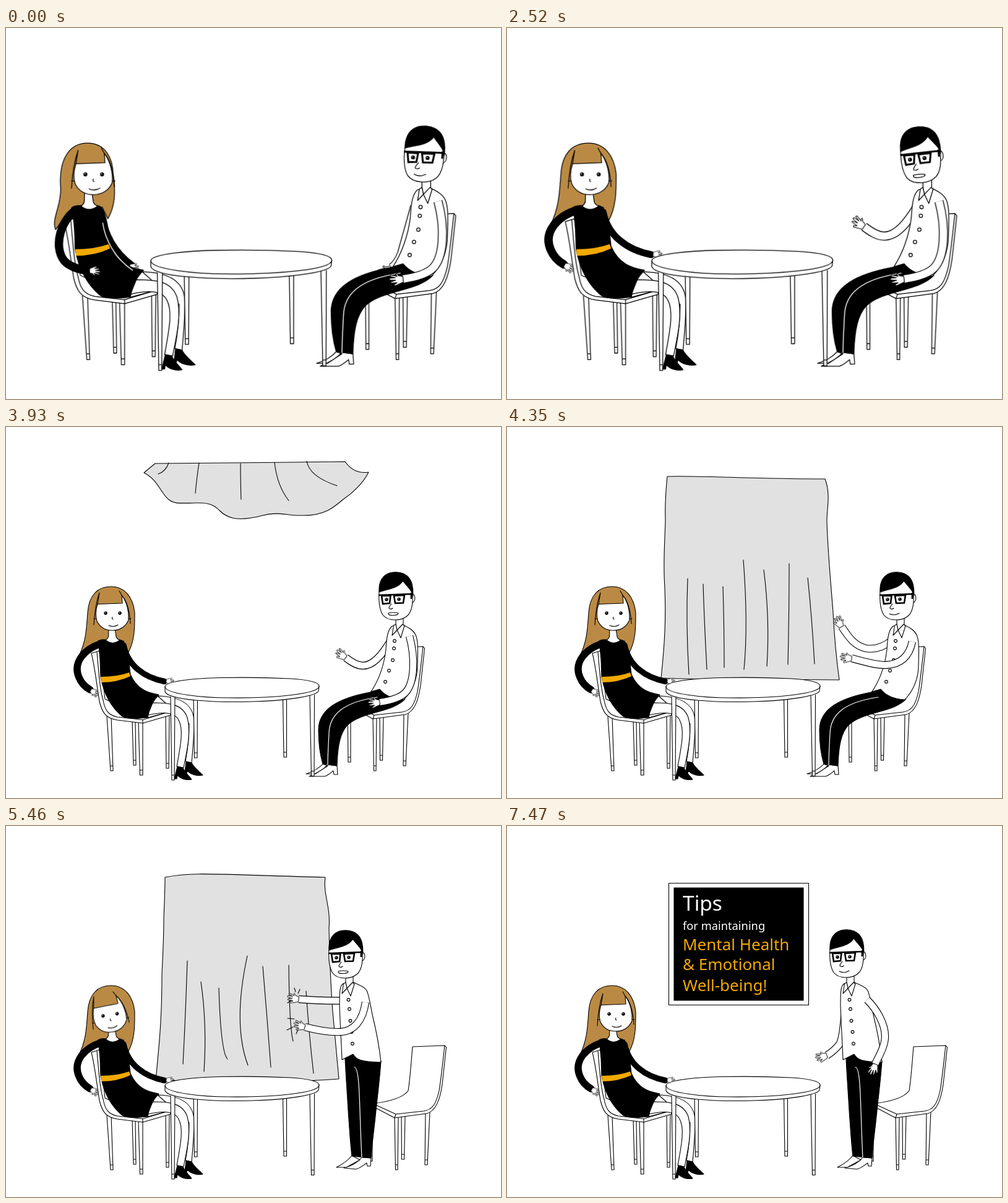
An HTML page for the animation above (7.53 s loop, 800x600 px).

```html
<!DOCTYPE html>
<html lang="en">
<head>
<meta charset="utf-8">
<title>Meeting at the table</title>
<style>
html, body { margin: 0; width: 100%; height: 100%; overflow: hidden; background: #fff; }
svg { display: block; width: 100%; height: 100%; }
path, circle, rect { fill: #fff; stroke: #000; stroke-width: 1.1; stroke-linejoin: round; }
.line { fill: none; stroke-linecap: round; }
.ink { fill: #000; }
.hair { fill: #ba8a45; }
.cloth { fill: #e1e1e1; }
.seam { fill: none; stroke: #fff; stroke-width: 1.2; stroke-linecap: round; }
.rim { fill: none; stroke-width: 12.4; }
.sleeve { fill: none; stroke: #fff; stroke-width: 10.2; }
.black { fill: none; stroke-width: 11.5; stroke-linecap: round; }
.thin { stroke-width: 9.5; }
.dot { fill: none; stroke-width: 5.8; stroke-linecap: round; }
.hole { fill: none; stroke: #fff; stroke-width: 3.6; stroke-linecap: round; }
.frame { fill: #fff; stroke-width: 2.6; stroke-linejoin: miter; }
.glint { fill: #fff; stroke: none; }
text { font-family: "Noto Sans", "Open Sans", sans-serif; font-weight: 500; font-size: 26px; fill: #f2a900; }
.wface { transform-origin: 172px 335px; }
.mhead { transform-origin: 636px 318px; }
.drop { transform-origin: 0 57px; }
</style>
</head>
<body>
<svg viewBox="0 0 800 600">
<defs>
  <path id="hand" d="M0-4L-7-6Q-10-12-11-8L-9-5L-19-8Q-22-6-18-5L-12-3L-21-3Q-24-1-20 0L-12 1L-20 3Q-22 5-18 5L-10 5L-15 8Q-15 11-11 9L0 5Z"/>
</defs>
<g class="camera">
  <g class="board">
    <rect x="261.5" y="92.5" width="226" height="197"/>
    <rect class="ink" x="270" y="100" width="209" height="182" stroke="none"/>
    <text x="284" y="137" style="font-size:33.5px;fill:#fff">Tips</text>
    <text x="284" y="168" style="font-size:18.3px;fill:#fff;font-weight:400">for maintaining</text>
    <text x="284" y="201">Mental Health</text>
    <text x="284" y="233">&amp; Emotional</text>
    <text x="284" y="267">Well-being!</text>
  </g>
  <g class="veil"><g class="drop">
    <path class="cloth sheet"/>
    <path class="line folds"/>
  </g></g>

  <!-- woman -->
  <g id="chairLegsW"></g>
  <path d="M138 366L151 362L160 440L229 470L266 460V466L221 479L180 474C160 471 155 460 151 444C147 420 144 390 138 366Z"/>
  <path class="line" d="M147 364C150 400 152 425 157 442C160 458 165 466 180 469L221 473.5L266 460M221 473.5V479"/>
  <path class="hair mane"/>
  <path class="black thin restArm"/>
  <g class="restHand"><use href="#hand" transform="scale(.6)"/></g>
  <path d="M245 435C285 436 304 450 304 478C304 500 302 520 300 543L290 541C294 520 296 500 296 480Z"/>
  <path d="M237 446C262 446 285 447 293 470C300 495 291 530 287 551L276 549C281 520 288 490 279 474C272 459 250 461 229 466Z"/>
  <path class="ink" d="M277 549L286 551C288 558 296 564 300 570C290 572 281 568 277 563L276 569H272Z"/>
  <path class="ink" d="M291 541L300 543C303 550 312 557 318 563C309 565 298 562 293 556L292 560L289 559Z"/>
  <path class="ink" d="M162 344Q172 354 183 344C188 344 191 348 193 354C199 370 199 385 201 400C212 425 230 430 247 433C238 442 231 455 229 470C210 472 195 472 188 468C168 452 158 430 153 405C152 385 153 365 148 347C152 343 158 344 162 344Z"/>
  <path d="M153 404Q180 404 199 397L201 403Q180 413 154 413Z" style="fill:#f2a900;stroke:none"/>
  <path class="seam crease" d="M191 368C194 390 207 416 232 433"/>
  <path class="black hipArm"/>
  <g class="hipHand"><use href="#hand" transform="scale(.65)"/></g>
  <path d="M166 326L165.500 339Q164 343 161 344.500Q172 354 184 344.500Q179 343 178 339L176 326" />
  <g class="wface">
    <path d="M148 286.500C145 296 144 305 147 314C152 324 161 329 172 329C185 329 194 322 198 312C199 300 196 284 187 272L188 285Z"/>
    <path class="line" d="M151 268L148 286.500M187 272L183 265M187 272C196 282 200 298 201 318M151 268C145 285 143 300 142 320M142 310H146M198 310H202"/>
    <circle class="ink" cx="161" cy="301" r="2.200"/><circle class="ink" cx="184" cy="301" r="2.200"/>
    <circle class="glint" cx="160.300" cy="300.300" r=".7"/><circle class="glint" cx="183.300" cy="300.300" r=".7"/>
    <path class="line" d="M172 307.500Q170.500 310 173 311M166 321Q174 324.500 181 320"/>
  </g>

  <!-- man -->
  <g class="chairM">
    <g id="chairLegsM"></g>
    <path d="M622 357L674 355L676.500 358L670 418C666 445 659 461 645 465L593 472L555 452L558 449C590 445 608 438 615 428C618 410 620 380 622 357Z"/>
    <path class="line" d="M674 355C670 390 668 410 665 428C660 450 654 459 640 461L595 466L558 449M595 466L593 472"/>
  </g>
  <path class="rim farArm"/><path class="sleeve farArm"/>
  <g class="farHand"><use href="#hand" transform="scale(.85)"/></g>
  <path class="shoes"/>
  <path class="ink trousers"/>
  <path class="seam inseam"/>
  <path class="shirt"/>
  <path class="dot buttons"/><path class="hole buttons"/>
  <g class="upper">
    <path d="M630 305V319L632 329L642 320V305"/>
    <path d="M626.500 321L624 337L632 328.500L638 341L644 321.500L641 319L632 328.500L630 319Z"/>
    <g class="mhead">
      <path d="M656 270C662 269 663 283 656 284Z"/>
      <path d="M603 266C602 282 604 296 609 304C618 315 639 314 649 305C656 298 658 284 657 268L641 248Z"/>
      <path class="ink" d="M603 267C602 250 609 240 620 236Q632 233 642 237C654 242 659 255 657.500 274C656 262 648 258 641.500 249C633 262 616 262 603 267Z"/>
      <path class="frame" d="M607 273L621.500 273L620 285L609 286ZM627 273L644 272L642 284.500L629 285Z"/>
      <path class="frame" d="M602 272L656 270M655 268V278"/>
      <circle class="ink" cx="615" cy="279" r="2.200"/><circle class="ink" cx="635" cy="278.500" r="2.200"/>
      <circle class="glint" cx="614.300" cy="278.300" r=".7"/><circle class="glint" cx="634.300" cy="277.800" r=".7"/>
      <path class="line" d="M623 286Q617 293 620 294Q623 295 625 293"/>
      <path class="mouth"/>
    </g>
  </g>
  <path class="rim nearArm"/><path class="sleeve nearArm"/>
  <g class="nearHand"><use href="#hand" transform="scale(.85)"/></g>
  <path class="line tugs" d="M455 286L461 282M466 262L468 268M475 264L472 271M455 311L466 312M454 330L464 325M469 336L472 329"/>

  <!-- table -->
  <g id="tableLegs"></g>
  <path d="M257 420C257 410 315 406 345 405.500C390 404.500 440 406 460 407C490 409 506 413 506 419L505 427C500 437 440 443 400 444C340 446 262 442 257 428Z"/>
  <path class="line" d="M257 420C258 432 320 438 360 438C430 439 506 432 506 419"/>
</g>
</svg>
<script>
const LOOP = 7530;

// Each leg: top x, top y, foot x, foot y, top width, foot width
const leg = ([x, y, fx, fy, w, fw]) =>
  `<path d="M${x} ${y}L${fx} ${fy}h${fw}L${x + w} ${y}M${fx} ${fy - 8}h${fw}"/>`;
const legs = (id, list) => { document.getElementById(id).innerHTML = list.map(leg).join(''); };

legs('chairLegsW', [[163, 468, 169, 556, 7, 4], [204, 474, 206, 547, 5, 4],
  [214, 476, 216.5, 563, 7, 4.5], [258, 464, 259, 552, 6, 4]]);
legs('chairLegsM', [[552, 450, 553, 542, 5, 4], [604, 468, 604.5, 539, 6, 4],
  [593, 470, 594.5, 556, 6, 3.5], [643, 462, 642, 548, 7, 4]]);
legs('tableLegs', [[303, 438, 304.5, 535, 6.5, 4.5], [447.5, 438, 449, 534, 6, 4.5],
  [266, 436, 268, 571, 7, 4], [491, 433, 493.5, 564.5, 7.5, 4.5]]);

// Keyframes are [ms, value, easing]; the ends are held to fill the loop.
const rules = [];
function anim(name, prop, keys) {
  const all = [[0, keys[0][1], keys[0][2]], ...keys, [LOOP, keys[keys.length - 1][1]]];
  const body = all.map(([ms, value, ease = 'ease-in-out']) =>
    `${(ms / LOOP * 100).toFixed(3)}%{${prop}:${value};animation-timing-function:${ease}}`).join('');
  rules.push(`@keyframes ${name}{${body}}.${name}{animation:${name} ${LOOP}ms infinite}`);
}
const move = (name, keys) => anim(name, 'transform', keys.map(([ms, x, y, turn = 0, ease]) =>
  [ms, `translate(${x}px,${y}px) rotate(${turn}deg)`, ease]));
const morph = (name, keys) => anim(name, 'd', keys.map(([ms, d, ease]) => [ms, `path("${d}")`, ease]));
const show = (name, from, to) => anim(name, 'opacity',
  [[0, 0, 'step-end'], [from, 1, 'step-end'], [to, to < LOOP ? 0 : 1, 'step-end']]);

const SINE = 'cubic-bezier(.37,0,.63,1)';
anim('camera', 'transform', [[2840, 'translate(-68px,-117px) scale(1.175)', SINE],
  [3390, 'translate(0px,0px) scale(1)']]);

// Woman
const mane = [
  'M126 377C120 362 134 345 133 320C130 280 145 258 170 258C195 258 205 280 205 300C209 325 208 345 198 362L190 346L150 346Z',
  'M118 370C130 345 130 325 132 300C134 272 148 258 170 258C192 258 205 275 208 300C208 320 209 345 197 366L190 346L150 346Z'];
morph('mane', [[1800, mane[0]], [2450, mane[1]]]);
morph('hipArm', [
  [1800, 'M155 350C134 362 122 400 138 420C146 429 160 432 172 434'],
  [2450, 'M155 350C128 358 107 380 118 405C122 415 129 421 136 425']]);
move('hipHand', [[1800, 173, 434, 180], [2450, 137, 426, 212]]);
morph('restArm', [
  [1800, 'M188 353C194 385 206 408 232 427'],
  [2450, 'M190 353C197 386 223 405 256 411.5']]);
move('restHand', [[1800, 228, 428, 190], [2450, 259, 411, 186]]);
anim('crease', 'opacity', [[1800, 1], [1950, 0]]);
move('wface', [[700, 6, 0], [1000, 6, 1], [1700, 6, 0], [2300, 0, 0], [4400, 0, 0], [5000, 1, 4, -9],
  [5600, 1, 4, -9], [6100, 4, 3], [6700, 4, 2], [7200, 4, 3]]);

// Man: sitting, then standing
const stand = (name, sit, up) => morph(name, [[4480, sit], [5050, up]]);
stand('shirt',
  'M624 322C617 328 615 340 614 360C611 385 602 410 590 428L604 424C612 434 625 440 643 441C655 428 665 410 665 385C666 360 666 345 662 336C658 328 650 324 642 320Z',
  'M545 255C539 258 539 270 539 290C540 320 542 350 543 378L561 369C566 378 575 382 606 382C603 355 597 325 592 305C589 290 587 275 583 266C580 260 570 257 562 253Z');
stand('trousers',
  'M588 429C540 438 505 455 505 490C505 515 509 535 512 545L535 548C536 515 540 495 552 482C575 460 625 462 645 440L604 422Z',
  'M548 376C549 400 552 440 553 460C555 490 557 520 559 534L590 537C592 510 595 490 597 470C600 440 604 410 606 380L561 368Z');
stand('inseam',
  'M600 437C545 445 523 465 522 495C521 515 520 530 520 546',
  'M563 390C570 390 571 430 572 460C573 490 574 520 575 536');
stand('shoes',
  'M512 545C505 553 497 557 485 561L500 561L520 548ZM520 546C512 555 502 560 490 565L515 565C521 563 525 559 529 556L530 562L536 562L535 548Z',
  'M559 533C552 542 544 547 534 552L550 552L572 540ZM575 536C568 545 558 550 546 553L565 555C572 554 578 548 583 545L584 550L589 550L590 537Z');
const dots = list => list.map(p => `M${p}h.01`).join('');
stand('buttons', dots(['628 346', '627 358', '625 377', '619 394', '613 412']),
  dots(['553.5 281', '555 296', '556.5 315', '558.5 333', '560 352']));
move('upper', [[4480, 0, 0], [5050, -81, -66]]);
move('chairM', [[4550, 0, 0], [5000, 35, 0]]);
move('mhead', [[150, 0, 0, 4], [500, 0, 0, 1], [900, 0, 0, 3], [1590, 0, 0, 1], [2200, 0, 0, -2],
  [2700, 0, 0, -5], [3060, 0, 0, -5], [3500, 0, 0, 0], [4400, 0, 0, 0], [4700, 0, 0, -4],
  [5050, 0, 0, 0], [5500, 0, 0, 0], [5700, 0, 0, 6], [6150, 0, 0, 0], [6500, 0, -2, 2],
  [6900, 0, -1, -1], [7400, 0, -1, 0]]);

const shut = 'M618 302Q626 306 634 301Q626 306 618 302Z';
const open = 'M618 301Q626 299 634 301Q635 304 626 304.5Q617 305 618 301Z';
const talk = [400, 700, 1000, 1300, 1850, 2150, 2450, 2750, 3320, 3620, 3930, 5160, 5460, 6300, 6600, 6900];
morph('mouth', talk.flatMap(t => [[t - 110, shut], [t - 40, open], [t + 50, open], [t + 130, shut]]));

const reach = 'M622 345C606 372 592 386 577 386C567 386 558 380 549 373';
const present = 'M622 345C606 366 592 380 577 380C567 380 557 376 547 372';
morph('farArm', [
  [150, 'M620 345C612 375 606 395 602 410C598 420 594 426 588 430'],
  [800, present], [1700, present], [2400, reach], [4000, reach],
  [4300, 'M622 345C606 358 592 360 580 358C562 354 552 340 541 323'],
  [4480, 'M622 345C606 358 592 360 580 358C562 354 552 340 541 323'],
  [5050, 'M552 283C540 282 525 283 510 282C498 282 486 281 473 280'],
  [5480, 'M552 283C540 282 525 283 510 282C498 282 486 281 473 280'],
  [5700, 'M550 285C560 320 590 340 620 330C635 325 650 315 660 305'],
  [5950, 'M550 285C560 320 590 340 620 330C635 325 650 315 660 305'],
  [6450, 'M546 290C545 320 543 340 538 352C532 360 525 366 517 371']]);
move('farHand', [[150, 588, 430, -30], [800, 547, 372, 12], [1150, 547, 372, 24], [1500, 547, 372, 12],
  [1700, 547, 372, 12], [2400, 549, 373, 36], [2800, 549, 373, 26], [3060, 549, 373, 36], [4000, 549, 373, 36],
  [4300, 541, 323, 60], [4480, 541, 323, 60], [5050, 473, 280, 10], [5480, 473, 280, 10],
  [5700, 660, 305, 150], [5950, 660, 305, 150], [6450, 517, 371, -15]]);

const lap = 'M652 338C662 375 660 415 645 430C636 439 618 443 604 445';
const push = 'M655 347C650 372 635 384 612 385C595 385 575 379 557 374';
const grip = 'M581 285C577 315 562 332 540 333C520 334 502 330 483 325';
const pull = 'M581 282C600 300 620 310 640 300C650 296 660 290 668 285';
morph('nearArm', [[4000, lap], [4300, push], [4480, push], [5050, grip], [5480, grip], [5700, pull], [5950, pull],
  [6450, 'M582 281C598 297 611 320 611 340C611 356 602 370 595 385']]);
move('nearHand', [[4000, 604, 445, -5], [4300, 557, 374, 5], [4480, 557, 374, 5], [5050, 483, 325, 15],
  [5480, 483, 325, 15], [5700, 668, 285, 160], [5950, 668, 285, 160], [6450, 595, 385, -70]]);
show('tugs', 5130, 5540);

// Cloth drops over the board and is pulled away
const bunch = 'M241 59C330 59 450 57 548 56C555 66 566 76 586 73C578 90 560 107 545 117C530 130 515 143 480 143C455 144 440 136 415 143C370 155 355 145 345 135C330 118 310 124 285 123C250 126 255 90 223 74C229 69 235 64 241 59Z';
const hang = 'M259 80C300 78 400 84 514 84C524 110 516 135 517 155C519 210 524 260 527 300C529 340 533 380 537 409C480 409 440 408 400 408C350 408 300 408 249 406C255 350 257 310 255 260C252 220 255 190 256 150C255 125 257 100 259 80Z';
const sway = 'M257 83C300 74 330 78 516 83C512 110 525 130 522 165C523 215 525 260 528 300C532 340 535 380 538 409C480 414 440 412 400 412C350 412 300 412 242 411C248 350 252 310 252 240C254 200 255 180 255 150C256 125 257 100 257 83Z';
const swept = 'M470 150C520 130 600 150 670 190C700 210 720 230 730 260C735 300 730 330 720 360C690 390 660 400 630 395C600 410 560 390 530 400C490 400 470 380 450 370C465 340 470 320 462 290C440 260 450 230 455 210C450 190 455 170 470 150Z';
morph('sheet', [[3930, bunch, 'ease-in'], [4200, sway, 'ease-out'], [4350, hang], [5000, hang], [5160, sway],
  [5310, hang], [5430, sway], [5500, sway, 'ease-in'], [5720, swept]]);
const bunchFolds = 'M263 58Q258 72 246 76M312 58Q308 85 306 107M312 58Q308 85 306 107M379 59Q379 90 380 117M379 59Q379 90 380 117M434 57C444 110 437 90 457 119M486 55Q490 80 535 95'.replace('C444 110 437 90', 'Q438 95');
const hangFolds = 'M292 245Q289 320 294 400M317 254Q319 320 323 392M349 258Q351 320 351 389M382 215Q390 320 383 392M415 231Q425 310 420 387M456 221Q456 300 454 384M486 244Q493 310 497 383';
const swayFolds = 'M293 218Q290 310 286 385M315 252Q325 320 320 397M344 262Q347 365 358 377M390 210Q366 320 391 387M415 227Q422 310 428 390M457 225Q458 325 464 348M485 267Q489 330 497 400';
const sweptFolds = 'M480 190Q500 260 480 330M510 180Q530 260 510 350M545 190Q560 260 550 350M580 190Q600 260 590 350M615 200Q640 260 620 340M650 215Q675 260 660 330M680 230Q700 270 690 320';
morph('folds', [[3930, bunchFolds, 'ease-in'], [4200, swayFolds, 'ease-out'], [4350, hangFolds], [5000, hangFolds],
  [5160, swayFolds], [5310, hangFolds], [5430, swayFolds], [5500, swayFolds, 'ease-in'], [5720, sweptFolds]]);
anim('drop', 'transform', [[3690, 'translate(0px,0px) scale(1,.04)', 'ease-out'], [3900, 'translate(0px,0px) scale(1,1)'],
  [5700, 'translate(0px,0px) scale(1,1)', 'ease-in'], [6080, 'translate(400px,60px) scale(1,1)']]);
show('veil', 3690, 6090);
show('board', 4400, LOOP);

document.head.appendChild(document.createElement('style')).textContent = rules.join('\n');
</script>
</body>
</html>
```
